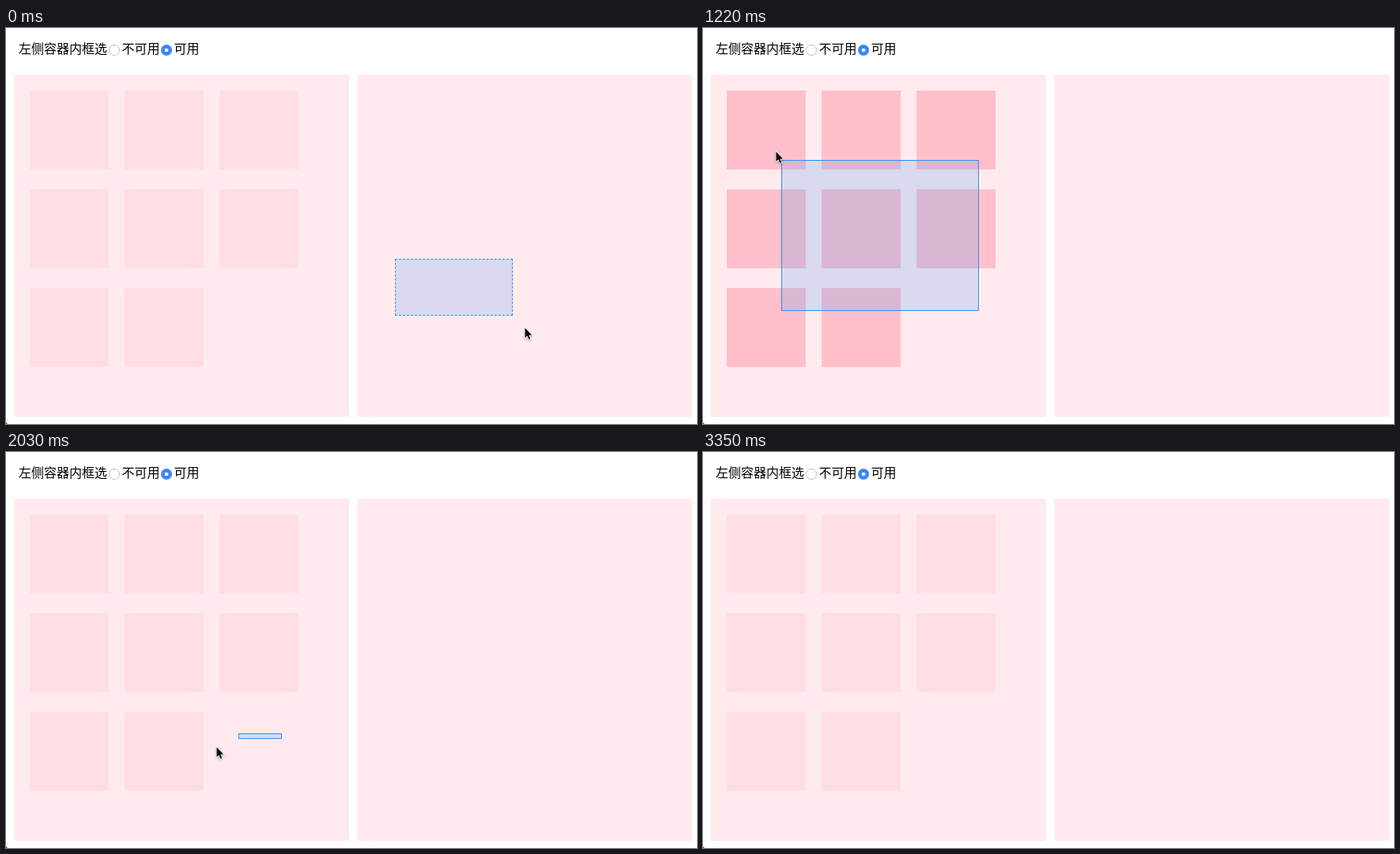
An HTML page for the animation above (4.09 s loop, 874 px wide and 501 px high).

```html
<!DOCTYPE html>
<html lang="zh-CN">
<head>
<meta charset="utf-8">
<style>
  html, body { margin: 0; width: 100%; height: 100%; overflow: hidden; background: #fff; }
  svg, #box { position: absolute; left: 0; top: 0; }
  text { font: 16px "Noto Sans CJK SC", "Noto Sans CJK", sans-serif; }
  #box { border: 1px solid #2d8cf0; background: rgba(45, 140, 240, .18); }
  #cursor { overflow: visible; filter: drop-shadow(0 1px 1px rgba(0, 0, 0, .35)); }
</style>
</head>
<body>
<svg id="stage" width="874" height="501">
  <text x="16" y="32">左侧容器内框选</text>
  <text x="146.5" y="32">不可用</text>
  <text x="212.5" y="32">可用</text>
  <circle cx="137" cy="28" r="6.5" fill="#fff" stroke="#bdbdbd"/>
  <circle cx="203" cy="28" r="7" fill="#3b88fd"/>
  <circle cx="203" cy="28" r="2.3" fill="#fff"/>
  <path d="M10 59h424v433H10zM444 59h424v433H444z" fill="#ffebed"/>
  <path d="M0 498q0 3 3 3H0z" fill="#333"/>
</svg>
<div id="box"></div>
<svg id="cursor" width="12" height="18">
  <path d="M.5 1.5V14L3.3 11.3 5.3 16 7.3 15.1 5.3 10.5H9.2Z" stroke="#fff" stroke-width="1.6" paint-order="stroke"/>
</svg>
<script>
const LOOP = 4090, STEP = 56.67;
const stage = document.getElementById('stage');
const box = document.getElementById('box');
const cursor = document.getElementById('cursor');

// Turning points of the pointer: [step, x, y]
const path = [
  [-1, 639, 362], [0, 656, 378], [3, 684, 406], [10, 347, 356], [13, 347, 356],
  [14, 336, 348], [15, 252, 289], [20, 99, 167], [21, 92, 155], [24, 84, 118],
  [26, 118, 132], [27, 220, 157], [30, 248, 255], [34, 294, 361], [35, 266, 372],
  [38, 212, 350], [43, 270, 252], [46, 288, 261], [52, 288, 261], [57, 834, 433]];

const slope = (i, col) => path[i] && path[i + 1]
  ? (path[i + 1][col] - path[i][col]) / (path[i + 1][0] - path[i][0]) : 0;

// Harmonic mean of both slopes, so the curve never overshoots a turning point
function tangent(i, col) {
  const a = slope(i - 1, col), b = slope(i, col);
  return a * b > 0 ? 2 * a * b / (a + b) : 0;
}

function pointer(step) {
  const next = path.findIndex(p => p[0] > step);
  if (next < 0) return path.at(-1).slice(1);
  const i = next - 1, span = path[next][0] - path[i][0];
  const u = (step - path[i][0]) / span, ease = u * u * (3 - 2 * u);
  return [1, 2].map(col => Math.round(
    path[i][col] + (path[next][col] - path[i][col]) * ease +
    span * u * (1 - u) * (tangent(i, col) * (1 - u) - tangent(next, col) * u)));
}

const cells = Array.from({ length: 8 }, (_, i) => {
  const x = 30 + i % 3 * 120, y = 79 + Math.floor(i / 3) * 125;
  const el = document.createElementNS('http://www.w3.org/2000/svg', 'rect');
  for (const [k, v] of Object.entries({ x, y, width: 100, height: 100 })) el.setAttribute(k, v);
  stage.append(el);
  return { x, y, el };
});

function draw(now) {
  const step = Math.max(0, Math.floor(now % LOOP / STEP - .5));
  const [cx, cy] = pointer(step);
  cursor.style.transform = `translate(${cx}px, ${cy}px)`;
  cursor.style.display = step < 58 ? '' : 'none';

  // The selection follows the pointer one step late
  const onRight = step < 5;
  const active = onRight || step > 14 && step < 53;
  const [ax, ay] = onRight ? [492, 292] : [347, 356];
  const [bx, by] = pointer(step - 1);
  const x = Math.min(ax, bx), y = Math.min(ay, by);
  const w = Math.abs(ax - bx), h = Math.abs(ay - by);
  box.style.cssText = `left:${x}px;top:${y}px;width:${w}px;height:${h}px;` +
    `border-style:${onRight ? 'dashed' : 'solid'};display:${active ? 'block' : 'none'}`;

  for (const c of cells) {
    const hit = active && x < c.x + 100 && x + w > c.x && y < c.y + 100 && y + h > c.y;
    c.el.setAttribute('fill', hit ? '#ffc0cb' : '#ffdee3');
  }
}

const start = performance.now();
function tick() {
  draw(performance.now() - start);
  requestAnimationFrame(tick);
}
tick();
</script>
</body>
</html>
```
